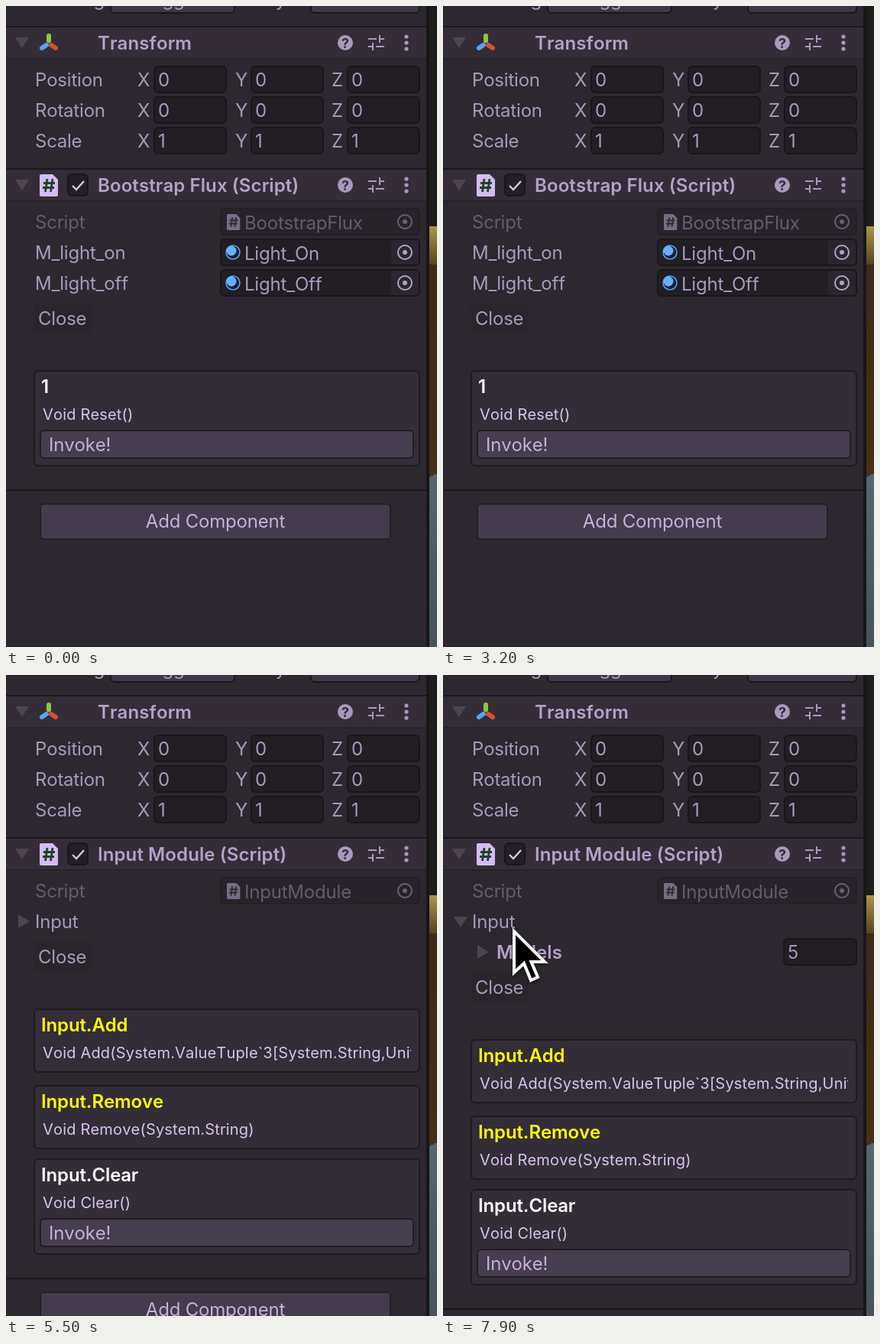
An HTML page that plays this animation: 564x838 px, repeating every 8000 ms.

```html
<!DOCTYPE html>
<html lang="en">
<head>
<meta charset="utf-8">
<title>Inspector</title>
<style>
  html, body { margin: 0; height: 100%; overflow: hidden; background: #2d282f; }
  svg { display: block; width: 564px; height: 838px; }
  text {
    font: 24px Inter, sans-serif; font-optical-sizing: none; font-kerning: none; font-variant-ligatures: none;
    letter-spacing: -.2px; fill: #a999bc; white-space: pre;
  }
  .bold { font-weight: 600; letter-spacing: .1px; fill: #b3a2c8; }
  .title { font-weight: 600; letter-spacing: -.12px; fill: #fff; }
  .yellow { fill: #ffff0c; }
  .small { font-size: 20px; letter-spacing: .18px; fill: #d8c5ec; }
  .button { fill: #c5b1da; }
  .dim { opacity: .45; }
</style>
</head>
<body>
<svg id="stage" viewBox="0 0 564 838">
  <defs>
    <linearGradient id="gold" x2="0" y2="1"><stop stop-color="#aa974b"/><stop offset="1" stop-color="#58421f"/></linearGradient>
    <linearGradient id="brown" x2="0" y2="1"><stop stop-color="#3d2a18"/><stop offset="1" stop-color="#472f19"/></linearGradient>
    <linearGradient id="slate" x2="0" y2="1"><stop stop-color="#56656f"/><stop offset="1" stop-color="#47525a"/></linearGradient>
    <clipPath id="cardClip"><path d="M40 0H530V838H40Z"/></clipPath>
  </defs>
</svg>
<script>
const text = (x, y, s, cls = '', extra = '') => `<text x="${x}" y="${y}" class="${cls}" ${extra}>${s}</text>`;
const rect = (x, y, w, h, fill, extra = '') => `<rect x="${x}" y="${y}" width="${w}" height="${h}" fill="${fill}" ${extra}/>`;
const path = (d, fill, extra = '') => `<path d="${d}" fill="${fill}" ${extra}/>`;
const circle = (x, y, r, fill, extra = '') => `<circle cx="${x}" cy="${y}" r="${r}" fill="${fill}" ${extra}/>`;
const box = (x, y, w, h, fill, edge = '#18161a') =>
  rect(x + 1, y + 1, w - 2, h - 2, fill, `rx="5" stroke="${edge}" stroke-width="2"`);
const field = (x, y, w, value = '', h = 36) => box(x, y, w, h, '#211e24') + text(x + 6, y + 27, value);
const rule = y => rect(0, y, 550, 2, '#1a181c');
const arrowDown = (x, y) => path(`M${x - 9} ${y - 7}h18l-9 14z`, '#4d4553');
const arrowRight = (x, y) => path(`M${x - 7} ${y - 9}v18l15-9z`, '#4d4553');
const target = y => circle(522, y, 9, 'none', 'stroke="#b3a2c8" stroke-width="2"') + circle(522, y, 3, '#b3a2c8');

function header(y, title) {
  const c = y + 22;
  return rect(0, y, 550, 43, '#342d38') + rule(y) + rect(0, y + 42, 550, 2, '#262229') +
    arrowDown(21, c) + text(120, c + 9, title, 'bold') +
    circle(444, c, 10, '#a999bc') +
    text(444, c + 7, '?', '', 'text-anchor="middle" style="font-size:18px;font-weight:700;fill:#342d38"') +
    path(`M474 ${c - 5}h11m4 0h6m-6-5v10M474 ${c + 5}h6m4 0h11m-15-5v10`, 'none', 'stroke="#a999bc" stroke-width="2"') +
    [-8, 0, 8].map(d => circle(524, c + d, 2.6, '#a999bc')).join('');
}

const scriptIcon = (x, y, k) => `<g transform="translate(${x} ${y}) scale(${k})">` +
  path('M2 0H17L24 7V27Q24 29 22 29H2Q0 29 0 27V2Q0 0 2 0Z', '#d5bcf0') +
  path('M10 6L7.5 23M17 6L14.5 23M5 11.5H20M4 17.5H19', 'none', 'stroke="#243f2c" stroke-width="2.8"') + '</g>';

function transformPanel() {
  const lobe = (dx, dy, color) => path(`M${56 + dx * .35} ${49 + dy * .35}L${56 + dx} ${49 + dy}`, 'none',
    `stroke="${color}" stroke-width="6" stroke-linecap="round"`);
  let s = text(86, 0, 'Tag') + box(136, -28, 164, 38, '#3f3747') + text(152, 0, 'Untagged') +
    text(326, 0, 'Layer') + box(398, -28, 144, 38, '#3f3747') + text(412, 0, 'Default') +
    header(26, 'Transform') + lobe(0, -10, '#8dc63f') + lobe(-9, 6, '#5aa2f2') + lobe(9, 6, '#d9502f');
  ['Position', 'Rotation', 'Scale'].forEach((name, i) => {
    const y = 78 + i * 40, value = i === 2 ? 1 : 0;
    s += text(38, y + 27, name);
    [['X', 172, 193], ['Y', 300, 320], ['Z', 426, 446]].forEach(([axis, x, fx]) =>
      s += text(x, y + 27, axis) + field(fx, y, 96, value));
  });
  return s;
}

const scriptPanel = (title, file) => transformPanel() + header(212, title) + scriptIcon(44, 220, 1) +
  box(80, 219, 28, 30, '#231f26') +
  path('M87 235l5 5 10-11', 'none', 'stroke="#d8c5ec" stroke-width="2.4"') +
  `<g class="dim">${text(38, 291, 'Script')}${box(280, 264, 262, 36, '#211e24')}` +
  `${scriptIcon(289, 272, .72)}${text(312, 292, file)}${target(282)}</g>`;

const materialRow = (y, label, value) => text(38, y + 27, label) + field(280, y, 262) +
  rect(504, y + 2, 36, 32, '#2a262d', 'rx="4"') + target(y + 18) +
  circle(297, y + 18, 9, '#16213a', 'stroke="#5d9fee" stroke-width="1.6"') +
  circle(295, y + 16, 6.5, '#6aaeff') + text(312, y + 28, value);

const closeRow = y => rect(36, y, 76, 39, '#29252b', 'rx="3"') + text(42, y + 28, 'Close');

function card(y, title, signature, invoke) {
  return box(36, y - 1, 506, invoke ? 126 : 84, '#332d38', '#1c1a1f') +
    text(46, y + 29, title, invoke ? 'title' : 'title yellow') +
    text(48, y + 64, signature, 'small', 'clip-path="url(#cardClip)"') +
    (invoke ? box(44, y + 77, 490, 38, '#463d4e', '#201d23') + text(56, y + 105, 'Invoke!', 'button') : '');
}

const footer = y => rule(y) + box(44, y + 18, 460, 48, '#443b4c', '#231f26') +
  text(274, y + 50, 'Add Component', 'button', 'text-anchor="middle"');

const bootstrap = scriptPanel('Bootstrap Flux (Script)', 'BootstrapFlux') +
  materialRow(304, 'M_light_on', 'Light_On') + materialRow(344, 'M_light_off', 'Light_Off') +
  closeRow(389) + card(477, '1', 'Void Reset()', true) + footer(632);

const request = 'System.Collections.IEnumerator Request_';
const scene = scriptPanel('Scene Flux (Script)', 'SceneFlux') +
  arrowRight(21, 322) + text(40, 331, '_list_scenes', 'bold') + field(445, 304, 97, 9) + closeRow(349) +
  [437, 537].map(y => card(y, 'SceneFlux.Add', request + 'AddAsync(System.String)')).join('') +
  [633, 733].map(y => card(y, 'SceneFlux.Remove', request + 'RemovesAsync()')).join('');

function inputModule(open) {
  const d = open ? 40 : 0;
  return scriptPanel('Input Module (Script)', 'InputModule') + text(38, 331, 'Input') +
    (open
      ? arrowDown(23, 323) + arrowRight(52, 362) + text(70, 371, 'Models', 'bold') + field(445, 344, 97, 5)
      : arrowRight(23, 322)) +
    closeRow(349 + d) +
    card(437 + d, 'Input.Add', 'Void Add(System.ValueTuple`3[System.String,UnityEngine.Object]') +
    card(537 + d, 'Input.Remove', 'Void Remove(System.String)') +
    card(633 + d, 'Input.Clear', 'Void Clear()', true) + footer(788 + d);
}

const gameView = rect(550, 0, 4, 838, '#171619') + rect(554, 0, 10, 288, '#1d1d1d') +
  rect(554, 288, 10, 50, 'url(#gold)') + rect(554, 338, 10, 280, 'url(#brown)') +
  path('M554 616h2v-2h4v-2h4V838H554Z', 'url(#slate)');

const panels = { bootstrap, scene, input: inputModule(false), inputOpen: inputModule(true) };
const stage = document.getElementById('stage');
stage.innerHTML += rect(0, 0, 564, 838, '#2d282f') +
  Object.entries(panels).map(([id, s]) => `<g id="${id}">${s}</g>`).join('') + gameView +
  '<g id="cursor" style="filter:drop-shadow(1px 2px 2px #0008)">' +
  path('M2 5V59L15 47 24 69 33 65 24.5 45H42Z', '#000', 'stroke="#fff" stroke-width="4" stroke-miterlimit="8"') + '</g>';
const cursor = document.getElementById('cursor');

// [start time, visible panel]
const schedule = [[0, 'bootstrap'], [1400, ''], [3200, 'bootstrap'], [3700, ''], [4100, 'scene'],
  [5000, ''], [5500, 'input'], [7400, 'inputOpen']];
// Each trip: [time, x, y] of the pointer tip
const trips = [
  [[800, 556, 345], [1200, 248, 572], [1600, 248, 572], [1700, 470, 334]],
  [[6400, 556, 592], [6800, 133, 419], [7200, 54, 326], [7500, 82, 324], [7800, 82, 324], [7900, 91, 330]]
];

function pointerAt(t) {
  const trip = trips.find(p => t >= p[0][0] && t <= p[p.length - 1][0]);
  if (!trip) return null;
  const i = Math.max(1, trip.findIndex(k => k[0] >= t));
  const [t0, x0, y0] = trip[i - 1], [t1, x1, y1] = trip[i];
  const k = (t - t0) / (t1 - t0), e = k * (2 - k);
  return [x0 + (x1 - x0) * e, y0 + (y1 - y0) * e];
}

function draw(now) {
  const t = Math.floor(now % 8000 / 100) * 100;
  const current = schedule.filter(s => s[0] <= t).pop()[1];
  for (const id in panels) document.getElementById(id).style.display = id === current ? '' : 'none';
  const p = pointerAt(t);
  cursor.style.display = p ? '' : 'none';
  if (p) cursor.setAttribute('transform', `translate(${p})`);
}

const start = performance.now();
function tick() {
  draw(performance.now() - start);
  requestAnimationFrame(tick);
}
tick();
</script>
</body>
</html>
```
